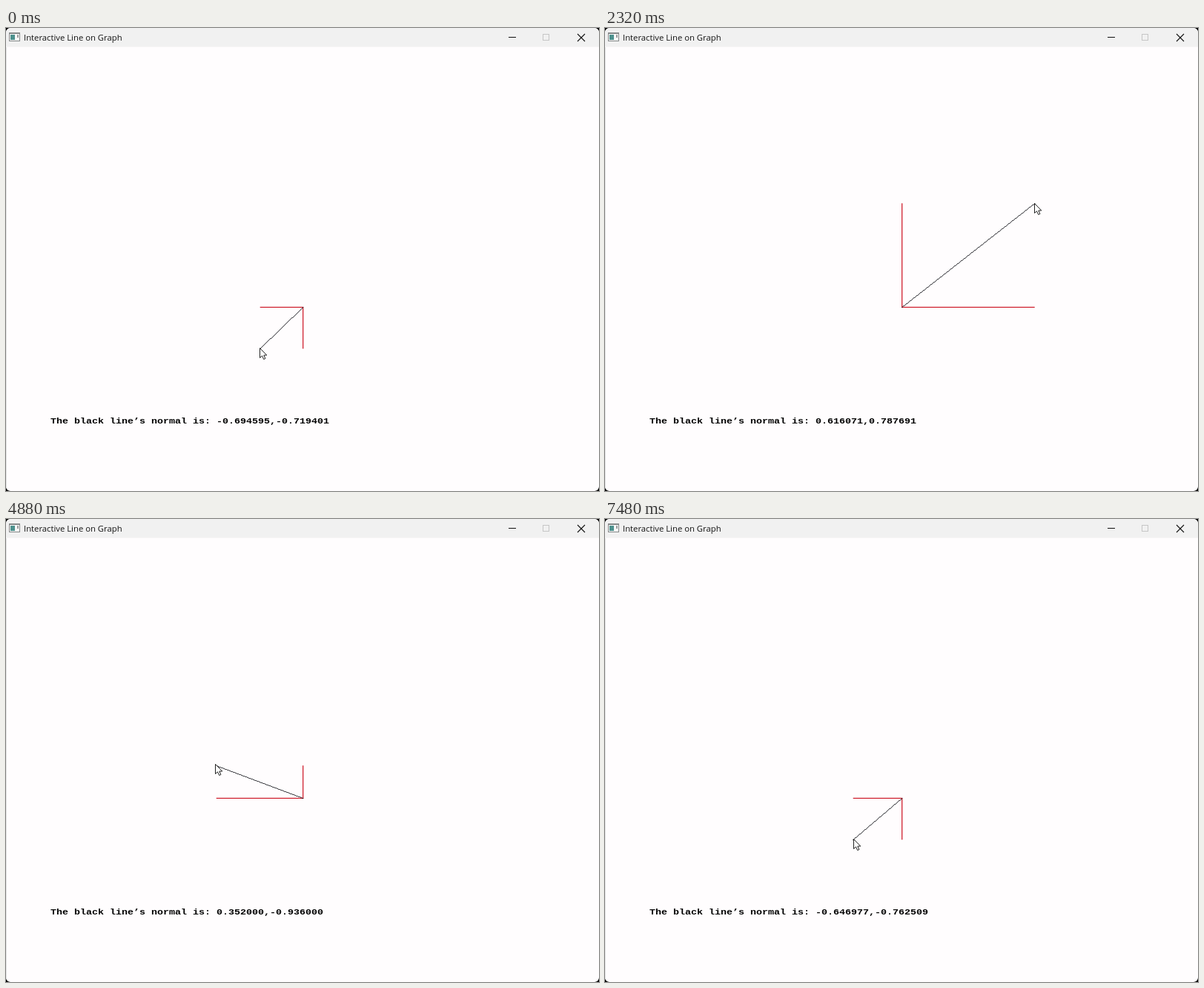
Animation, 800 px wide and 624 px high, one loop 7520 ms. Source, as an HTML page with a canvas:

```html
<!DOCTYPE html>
<html lang="en">
<head>
<meta charset="utf-8">
<title>Interactive Line on Graph</title>
<style>
html, body { margin: 0; height: 100%; overflow: hidden; background: #000; }
canvas { display: block; width: 800px; height: 624px; }
</style>
</head>
<body>
<canvas id="stage" width="800" height="624"></canvas>
<script>
const ctx = document.getElementById('stage').getContext('2d');
const LOOP = 7520, STEP = 40, CURSOR_LEAD = 8;
const ORIGIN = { x: 400, y: 376 };

// Where the pointer turns: [time in ms, x, y]
const turns = [
  [0, 342, 432], [420, 334, 404], [760, 412, 366], [1000, 590, 321],
  [1160, 634, 150], [1320, 638, 104], [1560, 647, 140], [2320, 579, 236],
  [3060, 594, 262], [3920, 319, 435], [4560, 296, 380], [4880, 283, 332],
  [6280, 116, 244], [6880, 200, 390], [7320, 318, 434], [7480, 334, 432]
];

function turnAt(i) {
  const n = turns.length, lap = Math.floor(i / n);
  const [t, x, y] = turns[i - lap * n];
  return [t + lap * LOOP, x, y];
}

// Smooth cubic through the turns, with slopes taken from the neighbours
function pointer(time) {
  time %= LOOP;
  const i = turns.findLastIndex(([t]) => t <= time);
  const [a, b, c, d] = [-1, 0, 1, 2].map(k => turnAt(i + k));
  const span = c[0] - b[0], u = (time - b[0]) / span;
  const along = k => {
    const m0 = (c[k] - a[k]) / (c[0] - a[0]) * span;
    const m1 = (d[k] - b[k]) / (d[0] - b[0]) * span;
    const rise = c[k] - b[k];
    return Math.round(b[k] + u * (m0 + u * (3 * rise - 2 * m0 - m1 + u * (m0 + m1 - 2 * rise))));
  };
  return { x: along(1), y: along(2) };
}

function rect(color, x, y, w, h) {
  ctx.fillStyle = color;
  ctx.fillRect(x, y, w, h);
}

function stroke(color, width, ...points) {
  ctx.strokeStyle = color;
  ctx.lineWidth = width;
  ctx.beginPath();
  points.forEach(([x, y]) => ctx.lineTo(x, y));
  ctx.stroke();
}

function drawWindow() {
  rect('#fffdfe', 0, 0, 800, 624);
  rect('#f1f1f1', 0, 0, 800, 25.5);
  rect('#e4e4e4', 0, 26, 1, 598);

  rect('#858989', 4, 6, 15, 12);
  rect('#f7f7f7', 5, 8, 13, 9);
  rect('#4d918d', 6, 9, 6, 7);
  rect('#9a9d9d', 15, 9, 2, 4);

  ctx.fillStyle = '#151515';
  ctx.font = '11.3px "Open Sans", "Noto Sans", sans-serif';
  ctx.fillText('Interactive Line on Graph', 24, 17);

  rect('#111', 678, 12, 10, 1);
  ctx.strokeStyle = '#c6c6c6';
  ctx.lineWidth = 1;
  ctx.strokeRect(724.5, 8.5, 8, 8);
  stroke('#111', 1.1, [771, 8], [781, 18]);
  stroke('#111', 1.1, [781, 8], [771, 18]);
}

// Unsmoothed line, one dot per step
function dottedLine(dx, dy) {
  const n = Math.max(Math.abs(dx), Math.abs(dy), 1);
  for (let i = 0; i <= n; i++) {
    rect('#1c1c22', ORIGIN.x + 0.3 + Math.round(dx * i / n), ORIGIN.y + Math.round(dy * i / n), 1, 1);
  }
}

function drawCursor({ x, y }) {
  ctx.save();
  ctx.translate(x + 0.5, y - 0.5);
  const arrow = new Path2D('M0 0V13L3 10.3 5.2 15 7.4 14 5.3 9.5H9.3Z');
  ctx.fillStyle = '#fff';
  ctx.fill(arrow);
  ctx.strokeStyle = '#222';
  ctx.lineWidth = 1;
  ctx.stroke(arrow);
  ctx.restore();
}

function drawNormal(dx, dy) {
  const length = Math.hypot(dx, dy) || 1;
  const normal = [-dy, dx].map(v => (v / length).toFixed(6)).join();
  ctx.save();
  ctx.translate(60, 533);
  ctx.scale(1, 0.8); // squat terminal lettering
  ctx.fillStyle = '#000';
  ctx.font = 'bold 13.33px "Liberation Mono", monospace';
  ctx.fillText('The black line’s normal is: ' + normal, 0, 0);
  ctx.restore();
}

function draw(time) {
  const tip = pointer(time);
  const dx = tip.x - ORIGIN.x, dy = tip.y - ORIGIN.y;
  const cx = ORIGIN.x + 0.7, cy = ORIGIN.y + 0.3;

  ctx.clearRect(0, 0, 800, 624);
  ctx.save();
  ctx.beginPath();
  ctx.roundRect(0, 0, 800, 624, 6);
  ctx.clip();
  drawWindow();
  stroke('#d0202f', 1.3, [cx + dx, cy], [cx, cy], [cx, cy + dy]);
  dottedLine(dx, dy);
  drawNormal(dx, dy);
  drawCursor(pointer(time + CURSOR_LEAD));
  ctx.restore();
}

const start = performance.now();
function tick() {
  const elapsed = (performance.now() - start) % LOOP;
  draw(Math.floor(elapsed / STEP) * STEP);
  requestAnimationFrame(tick);
}
tick();
</script>
</body>
</html>
```
